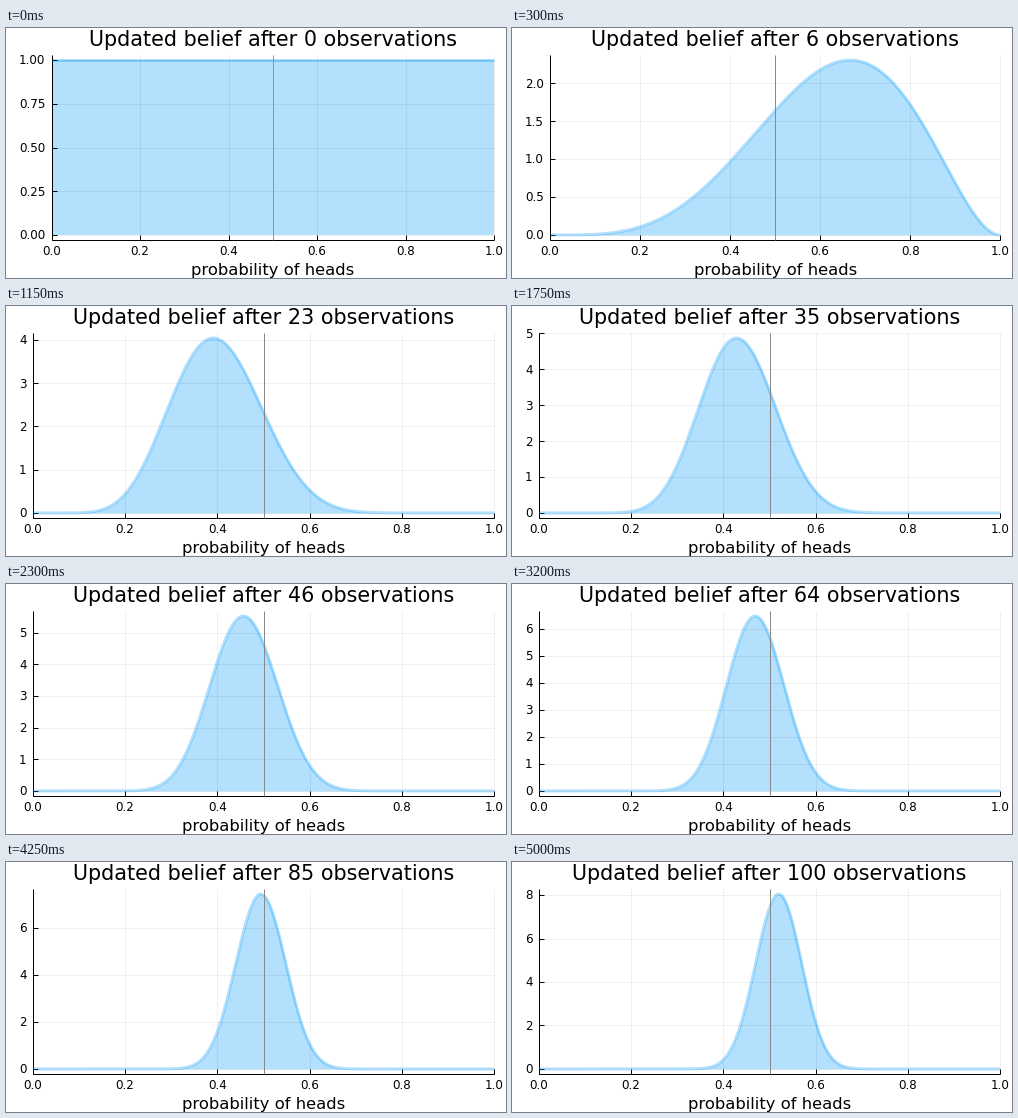
These frames come from a looping animation (500x250 px, 5050 ms). A matplotlib script:

```python
import math

import numpy as np
import matplotlib.pyplot as plt
from matplotlib.animation import FuncAnimation

W, H, DPI = 500, 250, 100
PX = 72 / DPI                      # points per pixel
RIGHT, TOP, BOTTOM = 488.2, 26.8, 212.2
BLUE = "#009AFA"
TICK_LEN = 5
LABEL_WIDTH = {0: 0, 1: 11.3, 2: 18.8}   # room for decimals on the y axis

# running count of heads, spread evenly between these flips
FLIPS = [0, 1, 2, 5, 13, 22, 33, 34, 35, 44, 45, 46, 55, 64, 77, 85, 100]
HEADS = [0, 1, 1, 3, 7, 9, 14, 14, 15, 20, 20, 21, 25, 30, 38, 42, 52]

plt.rcParams["font.family"] = "DejaVu Sans"
fig = plt.figure(figsize=(W / DPI, H / DPI), dpi=DPI, facecolor="white")
ax = fig.add_axes([0, 0, 1, 1])
grid_x = np.linspace(0, 1, 501)


def count_heads(n):
    return math.floor(np.interp(n, FLIPS, HEADS) + 0.5)


def beta_pdf(x, heads, tails):
    norm = math.factorial(heads + tails + 1) / (
        math.factorial(heads) * math.factorial(tails))
    return norm * x ** heads * (1 - x) ** tails


def tick_step(peak):
    """Pick the tick step with the best count, coverage and niceness."""
    best, best_score = 1, -1
    for step, nice in ((0.25, 0.5), (0.5, 0.9), (1, 1.0), (2, 0.7), (2.5, 0.5)):
        k = int(1.03 * peak / step) + 1
        if not 4 <= k <= 8:
            continue
        score = (0.25 * (1 - abs(k - 5) / 5) + 0.25 * nice
                 + 0.53 * peak / ((k - 1) * step))
        if score > best_score:
            best, best_score = step, score
    return best


def line(xs, ys, color="black", width=1.0, **kw):
    ax.plot(xs, ys, color=color, lw=width * PX, solid_capstyle="butt", **kw)


def text(x, y, s, size, ha="center"):
    ax.text(x, y, s, fontsize=size, ha=ha, va="baseline", color="black")


def draw(n):
    ax.clear()
    ax.set_xlim(0, W)
    ax.set_ylim(H, 0)
    ax.axis("off")

    heads = count_heads(n)
    tails = n - heads
    peak = beta_pdf(heads / n if n else 0.5, heads, tails)
    step = tick_step(peak)
    digits = {0.25: 2, 0.5: 1, 2.5: 1}.get(step, 0)
    left = 26.8 + LABEL_WIDTH[digits]

    def to_x(p):
        return left + p * (RIGHT - left)

    def to_y(v):
        return BOTTOM - (v / peak + 0.03) / 1.06 * (BOTTOM - TOP)

    x_ticks = [i / 5 for i in range(6)]
    y_ticks = np.arange(0, 1.03 * peak, step)

    for p in x_ticks:
        line([to_x(p)] * 2, [TOP, BOTTOM], alpha=0.06)
    for v in y_ticks:
        line([left, RIGHT], [to_y(v)] * 2, alpha=0.06)

    line([left, RIGHT], [BOTTOM] * 2)
    line([left] * 2, [TOP, BOTTOM])
    for p in x_ticks:
        line([to_x(p)] * 2, [BOTTOM, BOTTOM - TICK_LEN])
        text(to_x(p), 226.8, f"{p:.1f}", 8.56)
    for v in y_ticks:
        line([left, left + TICK_LEN], [to_y(v)] * 2)
        text(left - 6.2, to_y(v) + 4.4, f"{v:.{digits}f}", 8.56, "right")

    xs = to_x(grid_x)
    ys = to_y(beta_pdf(grid_x, heads, tails))
    ax.fill_between(xs, ys, to_y(0), color=BLUE, alpha=0.3, lw=0)
    line(xs, ys, BLUE, 3, alpha=0.3, solid_joinstyle="round")
    line([to_x(0.5)] * 2, [TOP, BOTTOM], "#E27A55" if n == 0 else "#8A8888")

    middle = to_x(0.5)
    text(middle, 18, f"Updated belief after {n} observations", 14.98)
    text(middle, 246.6, "probability of heads", 11.77)


anim = FuncAnimation(fig, draw, frames=101, interval=50,
                     init_func=lambda: draw(0), repeat=True, repeat_delay=0)
plt.show()
```
